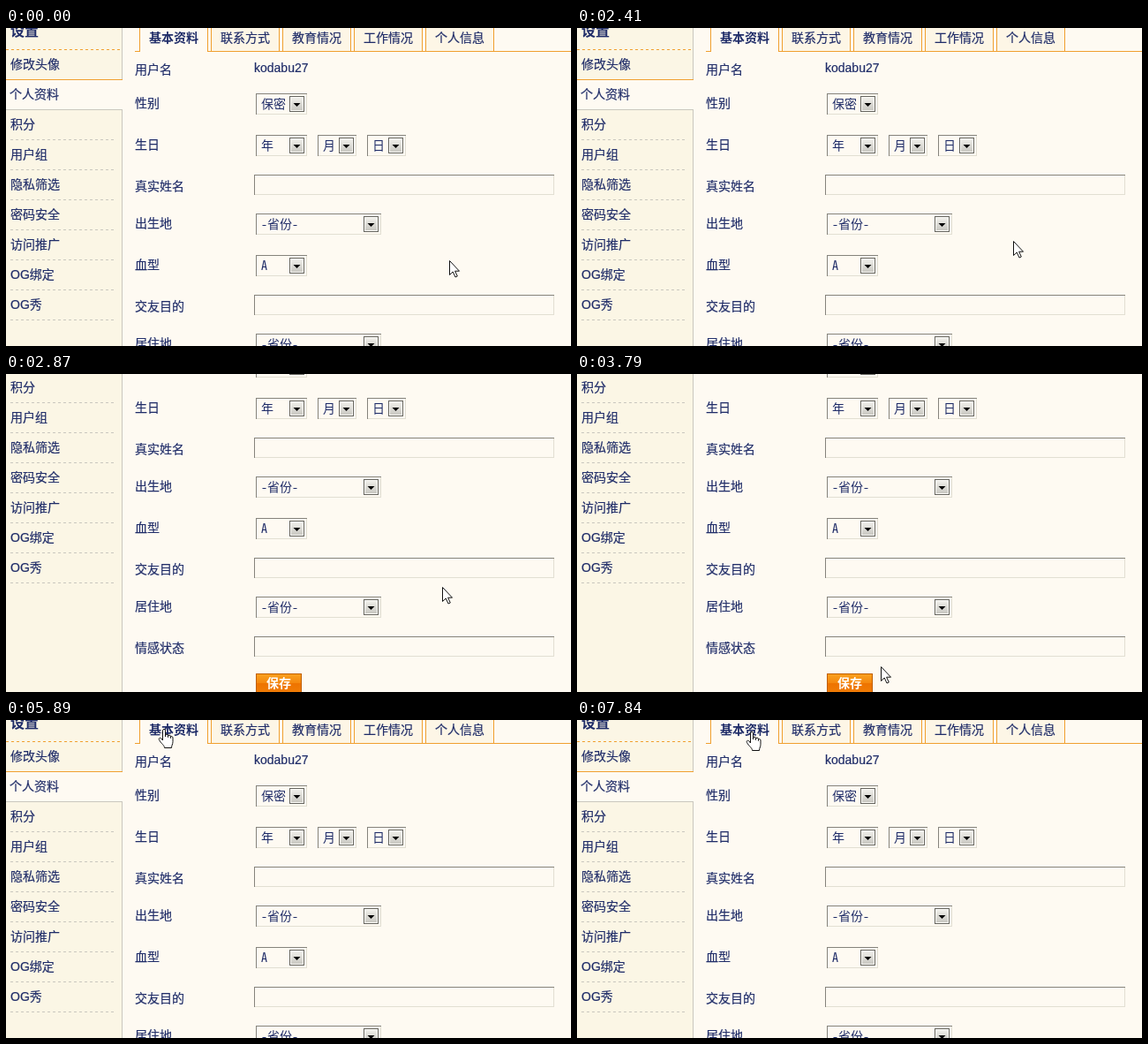
An HTML page for the animation above (7.99 s loop, 640 by 360 pixels).

```html
<!DOCTYPE html>
<html lang="zh-CN">
<head>
<meta charset="utf-8">
<title>个人资料</title>
<style>
html, body { margin: 0; width: 100%; height: 100%; overflow: hidden; background: #fefaf2; }
svg { display: block; width: 640px; height: 360px; }
rect, line { shape-rendering: crispEdges; }
text {
  font: 14px "Liberation Sans", "Noto Sans CJK SC", "Noto Sans CJK", sans-serif;
  fill: #1f2c68; stroke: #1f2c68; stroke-width: .2px; white-space: pre;
}
.b { font-weight: bold; stroke: none; }
.title { font-size: 16px; }
.save { fill: #fff; }
.opt { font-family: "Noto Sans Mono CJK SC", "Noto Sans CJK SC", "Noto Sans CJK", monospace; stroke: none; }
</style>
</head>
<body>
<svg viewBox="0 0 640 360">
  <defs>
    <linearGradient id="save" x2="0" y2="1">
      <stop stop-color="#f9a01f"/><stop offset=".45" stop-color="#f5890f"/>
      <stop offset=".5" stop-color="#ee7400"/><stop offset="1" stop-color="#f07c05"/>
    </linearGradient>
    <linearGradient id="btn" x2="0" y2="1">
      <stop stop-color="#f0efea"/><stop offset="1" stop-color="#c9c8c2"/>
    </linearGradient>
  </defs>
  <g id="page"></g>
  <path id="arrow" d="M.5 .5V16.5L4.2 13L7 19L9.3 18L6.6 12.2H11.5Z" fill="#fff" stroke="#111"/>
  <path id="hand" fill="#fff" stroke="#111" stroke-linejoin="round"
    d="M-1.5 13V1.8C-1.5 0 1.5 0 1.5 1.8V9V7.3C1.5 5.8 4.5 5.8 4.5 7.3V9.5V8.2C4.5 6.8 7.5 6.8 7.5 8.2V10.5V9.3C7.5 8.2 10 8.2 10 10V14.5C10 17.5 8.5 18.5 8.5 21.5H.5C.5 18.5-3.5 16.5-5.5 12.5C-6.5 10.5-4.5 9.5-3 11Z"/>
</svg>
<script>
const $ = id => document.getElementById(id);
const page = $('page');
const BG = '#fefaf2', ORANGE = '#f0a030', DARK = '#85837c', PALE = '#e2dfd3', GREY = '#c9c7be';

function add(tag, attrs, text) {
  const el = document.createElementNS('http://www.w3.org/2000/svg', tag);
  for (const k in attrs) el.setAttribute(k, attrs[k]);
  if (text) el.textContent = text;
  page.append(el);
}
const box = (x, y, width, height, fill) => add('rect', { x, y, width, height, fill });
const label = (s, x, mid, cls = '') => add('text', { x, y: mid + 5, class: cls }, s);
const dash = (x1, x2, y, stroke) =>
  add('line', { x1, x2, y1: y + .5, y2: y + .5, stroke, 'stroke-dasharray': '3 3' });

// Sunken frame: dark top and left, pale bottom and right
function frame(x, y, w, h) {
  box(x, y + h - 1, w, 1, PALE);
  box(x + w - 1, y, 1, h, PALE);
  box(x, y, w, 1, DARK);
  box(x, y, 1, h, DARK);
}

function select(s, x, y, w) {
  frame(x, y, w, 24);
  label(s, x + 6, y + 12, 'opt');
  const bx = x + w - 20, by = y + 3;
  box(bx, by, 17, 18, '#66655f');
  box(bx + 1, by + 1, 15, 16, '#fbfaf6');
  box(bx + 2, by + 2, 13, 14, 'url(#btn)');
  add('path', { d: `M${bx + 4.5} ${by + 8}h8l-4 4z`, fill: '#000' });
}

// Sidebar
box(0, 0, 131, 460, '#fbf6e5');
box(131, 0, 1, 460, GREY);
box(0, 58, 132, 34, BG);
box(0, 58, 132, 1, ORANGE);
box(0, 92, 132, 1, GREY);
dash(0, 132, 24, ORANGE);
label('设置', 5, 4, 'b title');
['修改头像', '个人资料', '积分', '用户组', '隐私筛选', '密码安全', '访问推广', 'OG绑定', 'OG秀']
  .forEach((s, i) => {
    label(s, i === 1 ? 4 : 5, 41 + 34 * i);
    if (i > 1) dash(5, 122, 58 + 34 * i, GREY);
  });

// Tabs
box(146, 26, 494, 1, ORANGE);
['基本资料', '联系方式', '教育情况', '工作情况', '个人信息'].forEach((s, i) => {
  const x = 151 + 81 * i;
  box(x, 0, 78, 26, ORANGE);
  box(x + 1, 0, 76, i ? 26 : 27, i ? '#fdf6e6' : BG);
  label(s, x + 11, 11, i ? '' : 'b');
});

// Form: a row holds plain text, an input or a list of selects
let mid = 47;
const row = (name, height, draw) => { label(name, 146, mid); draw(); mid += height; };
const textRow = (name, s) => row(name, 38, () => label(s, 281, mid - 2));
const inputRow = name => row(name, 42, () => frame(281, mid - 13, 340, 23));
const selectRow = (name, ...items) => row(name, 47, () => {
  let x = 283;
  for (const [s, w] of items) {
    select(s, x, mid - 11, w);
    x += w + 12;
  }
});
textRow('用户名', 'kodabu27');
selectRow('性别', ['保密', 58]);
selectRow('生日', ['年', 58], ['月', 44], ['日', 44]);
inputRow('真实姓名');
selectRow('出生地', ['-省份-', 142]);
selectRow('血型', ['A', 58]);
inputRow('交友目的');
selectRow('居住地', ['-省份-', 142]);
inputRow('情感状态');
box(283, mid - 13, 52, 23, '#c05e00');
box(284, mid - 12, 50, 21, 'url(#save)');
label('保存', 295, mid - 2, 'b save');

// Motion: smooth paths sampled in hard steps
const LOOP = 7990, STEP = 150, HAND_FROM = 5890;

function sample(from, to, path) {
  const steps = [];
  for (let t = from; t <= to; t += STEP) steps.push([t, ...path(t)]);
  return steps;
}

// Circling over the form
const circle = t => {
  const a = (t - 1360) / 132;
  return [366 + 149 * Math.cos(a), 165 + 130 * Math.sin(a)];
};

// Down to the button, then up to the first tab
const stops = [[3190, 494, 241], [3640, 253, 310], [3790, 344, 331], [4540, 390, 290],
  [5140, 313, 234], [5290, 311, 219], [HAND_FROM, 179, 10]];
const travel = t => {
  const i = stops.findIndex(s => s[0] >= t);
  const [t0, x0, y0] = stops[i - 1], [t1, x1, y1] = stops[i];
  const k = (t - t0) / (t1 - t0);
  return [x0 + (x1 - x0) * k, y0 + (y1 - y0) * k];
};

// Figure of eight over the tab
const hover = t => {
  const a = (t - HAND_FROM) / 140;
  return [203 - 24 * Math.cos(a), 10 + 8 * Math.sin(2 * a)];
};

const moves = [
  [0, 502, 263],
  ...sample(310, 2110, circle),
  [2260, 495, 241], [2410, 494, 241],
  ...sample(3340, HAND_FROM - STEP, travel),
  ...sample(HAND_FROM, 7840, hover)
];
const scrolls = [[0, 0, 0], [2720, 0, -48], [2870, 0, -94], [5290, 0, 0]];

function play(el, steps, shown = () => true) {
  const keys = steps.map(([t, x, y]) => ({
    offset: t / LOOP,
    transform: `translate(${Math.round(x)}px, ${Math.round(y)}px)`,
    opacity: shown(t) ? 1 : 0,
    easing: 'step-end'
  }));
  keys.push({ ...keys[keys.length - 1], offset: 1 });
  el.animate(keys, { duration: LOOP, iterations: Infinity });
}
play(page, scrolls);
play($('arrow'), moves, t => t < HAND_FROM);
play($('hand'), moves, t => t >= HAND_FROM);
</script>
</body>
</html>
```
